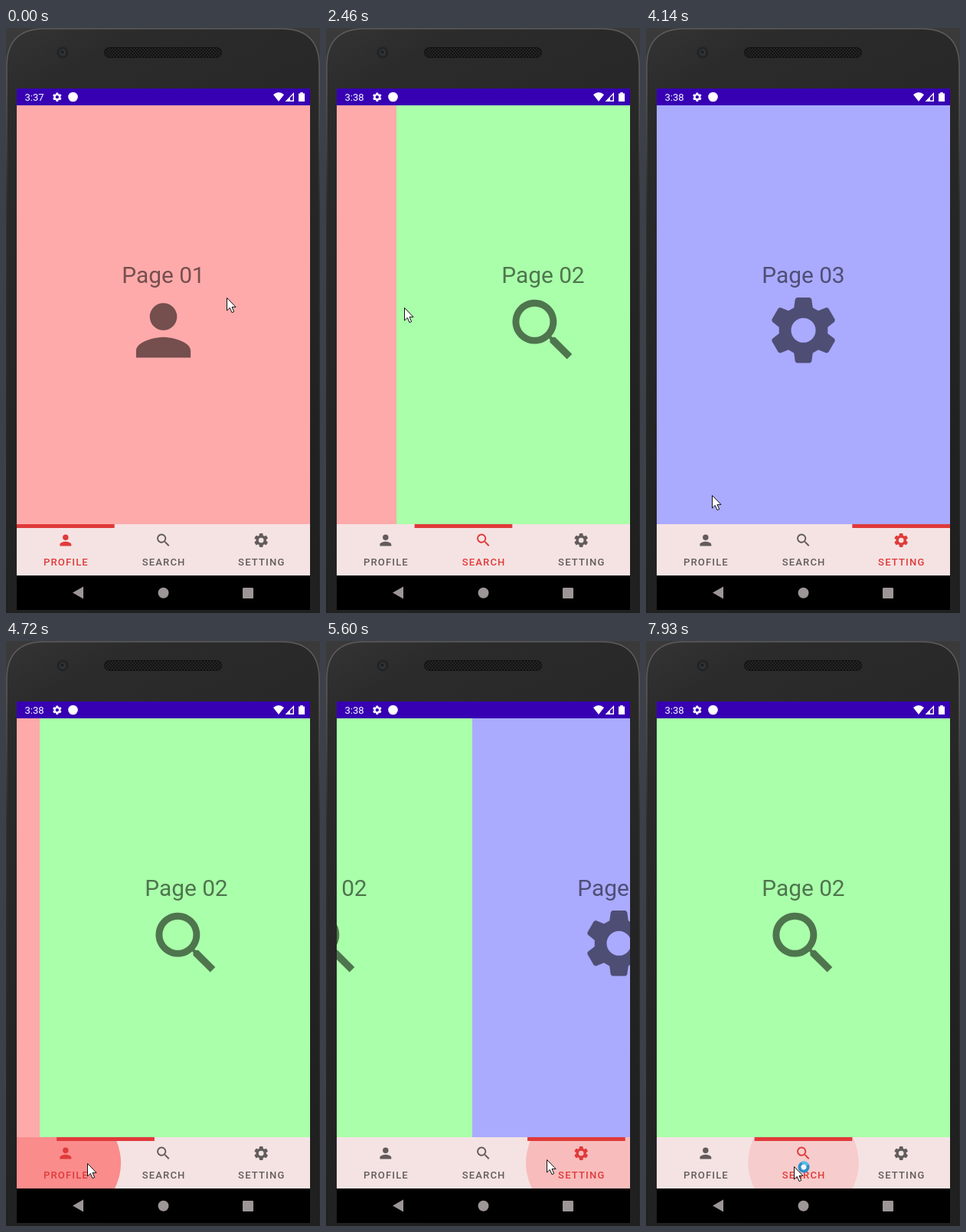
Recreate the animation shown at these times as an HTML page. Size 410 by 764 pixels, loop 8 s.

```html
<!DOCTYPE html>
<html lang="en">
<head>
<meta charset="utf-8">
<title>Swipeable tabs</title>
<style>
  html, body { margin: 0; width: 100%; height: 100%; overflow: hidden; background: #3a3a3b; }
  svg { display: block; }
  text { font-family: Roboto, sans-serif; text-anchor: middle; }
  .page text { font-size: 29.8px; }
  .page { fill: rgba(0, 0, 0, .54); }
  .tab { fill: rgba(0, 0, 0, .6); }
  .tab.on { fill: #e03a3a; }
  .tab text { font-size: 13.05px; font-weight: 500; letter-spacing: .0892em; }
</style>
</head>
<body>
<svg id="stage" width="410" height="764" viewBox="0 0 410 764">
  <defs>
    <linearGradient id="body" x1="0" y1="0" x2=".3" y2="1">
      <stop offset="0" stop-color="#343435"/>
      <stop offset=".12" stop-color="#2b2b2c"/>
      <stop offset="1" stop-color="#202021"/>
    </linearGradient>
    <linearGradient id="edge" x1="0" y1="0" x2="0" y2="1">
      <stop offset="0" stop-color="#5c5a5b"/>
      <stop offset=".08" stop-color="#5c5a5b"/>
      <stop offset=".3" stop-color="#2e2e2f"/>
      <stop offset="1" stop-color="#1c1c1d"/>
    </linearGradient>
    <pattern id="mesh" width="4" height="4" patternUnits="userSpaceOnUse">
      <circle cx="1" cy="1" r=".9" fill="#2c2c2c"/><circle cx="3" cy="3" r=".9" fill="#2c2c2c"/>
    </pattern>
    <path id="person" d="M12 12a4 4 0 1 0 0-8a4 4 0 0 0 0 8zm0 2c-2.67 0-8 1.34-8 4v2h16v-2c0-2.66-5.33-4-8-4z"/>
    <path id="search" fill-rule="evenodd" d="M15.5 14h-.79l-.28-.27A6.5 6.5 0 1 0 13.73 14.43l.27.28v.79l5 4.99L20.49 19zM9.5 14a4.5 4.5 0 1 1 0-9a4.5 4.5 0 0 1 0 9z"/>
    <path id="gear" fill-rule="evenodd"/>
  </defs>

  <!-- phone -->
  <path d="M1 770V50Q1 1 50 1H360Q409 1 409 50V770z" fill="url(#body)" stroke="url(#edge)" stroke-width="1.5"/>
  <circle cx="74" cy="32" r="7.5" fill="#222324"/>
  <circle cx="74" cy="32" r="4.5" fill="#303336"/>
  <circle cx="73.5" cy="31.5" r="2" fill="#1b1d1f"/>
  <rect x="128" y="25" width="154" height="14" rx="7" fill="#131313"/>
  <rect x="129" y="26" width="152" height="12" rx="6" fill="url(#mesh)"/>

  <!-- status bar -->
  <rect x="14" y="79" width="383" height="22" fill="#3700b3"/>
  <g fill="#fff">
    <text id="clock" x="37" y="95" font-size="13"></text>
    <use href="#gear" transform="translate(59.6 83) scale(.6)"/>
    <circle cx="87.5" cy="90" r="6.3"/>
    <path d="M349 87Q356 81 363 87L356 96z"/>
    <path fill-rule="evenodd" d="M364.5 96L376 84V96zM371 94.6H374.6V87.3L371 91z"/>
    <path d="M382 85.5H384.2V84H387.8V85.5H390V96H382z"/>
  </g>

  <svg x="14" y="101" width="383" height="547"><g id="pager"></g></svg>

  <g id="tip">
    <rect x="156" y="611" width="71" height="30" rx="2" fill="#616161" fill-opacity=".9"/>
    <text x="191.5" y="631" font-size="13" fill="#fff">Search</text>
  </g>

  <svg x="14" y="648" width="383" height="67">
    <rect width="383" height="67" fill="#f5e3e3"/>
    <circle id="ripple" fill="#fc7d7d"/>
    <g id="tabs"></g>
    <rect id="bar" width="127.67" height="5" fill="#e03a3a"/>
  </svg>

  <!-- navigation -->
  <rect x="14" y="715" width="383" height="45"/>
  <g fill="#9d9696">
    <path d="M87 737.5L101 729.5V745.5z"/>
    <circle cx="205.5" cy="737.8" r="7"/>
    <rect x="309" y="731" width="14" height="14" rx="1"/>
  </g>

  <g id="cursor">
    <circle id="press" cx="-1" cy="1" r="12" fill="#fbb73c"/>
    <path d="M.5 .5V17L4.3 13.4L7 19.6L9.7 18.5L7 12.4H12z" fill="#fff" stroke="#111" stroke-linejoin="round"/>
    <g id="busy" fill="none" stroke-width="4">
      <circle r="5.5" stroke="#2d8fc9" fill="#f4f8fb"/>
      <path d="M0-5.5A5.5 5.5 0 0 1 5.5 0" stroke="#58bde8"/>
    </g>
  </g>
</svg>
<script>
const LOOP = 8000, W = 383, TAB = W / 3;
const $ = id => document.getElementById(id);
const clamp = v => Math.min(1, Math.max(0, v));
const within = (t, a, b) => t >= a && t < b;

// easings
const linear = k => k;
const out = k => 1 - (1 - k) ** 2;
const smooth = k => k * k * (3 - 2 * k);
const standard = k => {              // cubic-bezier(.4, 0, .2, 1)
  let lo = 0, hi = 1;
  for (let i = 0; i < 20; i++) {
    const s = (lo + hi) / 2, r = 1 - s;
    if (1.2 * r * r * s + .6 * r * s * s + s ** 3 < k) lo = s; else hi = s;
  }
  return smooth(lo);
};

// moves: [from time, to time, target value, easing]
const track = (v, moves, t) => {
  for (const [a, b, to, ease] of moves)
    if (t >= a) v += (to - v) * ease(clamp((t - a) / (b - a)));
  return v;
};

const swipes = [
  [2180, 2340, .476, linear], [2340, 2662, 1, out],
  [2970, 3210, 1.327, linear], [3210, 3480, 2, out]
];
const pageMoves = [...swipes, [4586, 5006, 0, out], [5383, 5803, 2, out], [7600, 7900, 1, out]];
const barMoves = [...swipes, [4566, 4866, 0, standard], [5361, 5661, 2, standard], [7600, 7900, 1, standard]];

const path = [
  [160, 310, 285, 366, smooth], [2180, 2340, 102, 365, linear],
  [2500, 2820, 310, 405, smooth], [2970, 3210, 183, 413, linear],
  [3630, 4150, 86, 610, smooth], [4150, 4430, 106, 682, smooth],
  [5000, 5230, 288, 677, smooth], [5800, 6040, 193, 686, smooth]
];
const pathX = path.map(([a, b, x, , e]) => [a, b, x, e]);
const pathY = path.map(([a, b, , y, e]) => [a, b, y, e]);

const selections = [[0, 0], [2340, 1], [3210, 2], [4566, 0], [5361, 2], [7600, 1]];
const presses = [[2180, 2340], [2970, 3210], [4500, 4566], [5310, 5361], [6120, 6700], [7560, 7620]];
// tab, touch time, fade time
const ripples = [[0, 4500, 4698], [2, 5310, 5508], [1, 6120, 6830], [1, 7560, 7815]];

// six teeth around a round hole
const tooth = [[-2.76, -6.65], [-2.4, -9.19], [-1.92, -9.6], [1.92, -9.6], [2.4, -9.19], [2.76, -6.65]];
const rim = [];
for (let i = 0; i < 6; i++) {
  const c = Math.cos(i * Math.PI / 3), s = Math.sin(i * Math.PI / 3);
  for (const [x, y] of tooth) rim.push([12 + x * c - y * s, 12 + x * s + y * c].map(n => n.toFixed(2)));
}
$('gear').setAttribute('d', `M${rim.join('L')}zM12 8.4a3.6 3.6 0 1 0 0 7.2a3.6 3.6 0 0 0 0-7.2z`);

const icons = ['person', 'search', 'gear'];
const colors = ['#faa', '#afa', '#aaf'];
const labels = ['PROFILE', 'SEARCH', 'SETTING'];
$('pager').innerHTML = icons.map((icon, i) => `
  <g class="page" transform="translate(${i * W})">
    <rect width="${W}" height="547" fill="${colors[i]}"/>
    <text x="191.5" y="232">Page 0${i + 1}</text>
    <use href="#${icon}" transform="translate(138.1 240.4) scale(4.45)"/>
  </g>`).join('');
$('tabs').innerHTML = icons.map((icon, i) => `
  <g class="tab" transform="translate(${(i + .5) * TAB})">
    <use href="#${icon}" transform="translate(-11.2 9.8) scale(.932)"/>
    <text x=".6" y="54">${labels[i]}</text>
  </g>`).join('');
const tabs = [...$('tabs').children];

const set = (id, attrs) => {
  for (const k in attrs) $(id).setAttribute(k, attrs[k]);
};

function draw(t) {
  const x = Math.round(track(288, pathX, t)), y = Math.round(track(352, pathY, t));
  set('cursor', { transform: `translate(${x} ${y})` });
  set('press', { opacity: presses.some(([a, b]) => within(t, a, b)) ? 1 : 0 });
  set('busy', { opacity: t > 7630 ? 1 : 0, transform: `translate(13 1) rotate(${t * .36 % 360})` });

  $('clock').textContent = t < 1450 ? '3:37' : '3:38';
  set('pager', { transform: `translate(${-Math.round(W * track(0, pageMoves, t))})` });
  set('bar', { x: TAB * track(0, barMoves, t) });

  const on = selections.filter(([a]) => t >= a).pop()[1];
  tabs.forEach((tab, i) => tab.classList.toggle('on', i === on));

  const live = ripples.find(([, a, b]) => within(t, a, b + 150));
  if (live) {
    const [tab, a, b] = live, k = out(clamp((t - a) / 210));
    const cx = (tab + .5) * TAB;
    set('ripple', {
      cx: x - 14 + (cx - x + 14) * k,
      cy: y - 648 + (33.5 - y + 648) * k,
      r: 20 + 52.2 * k,
      opacity: clamp((t - a + 20) / 75) * (1 - clamp((t - b) / 150))
    });
  } else set('ripple', { opacity: 0 });

  set('tip', { opacity: t < 6615 ? 0 : out(clamp((t - 6600) / 150)) * (1 - clamp((t - 7570) / 75)) });
}

const start = performance.now();
(function tick() {
  draw((performance.now() - start) % LOOP);
  requestAnimationFrame(tick);
})();
</script>
</body>
</html>
```
